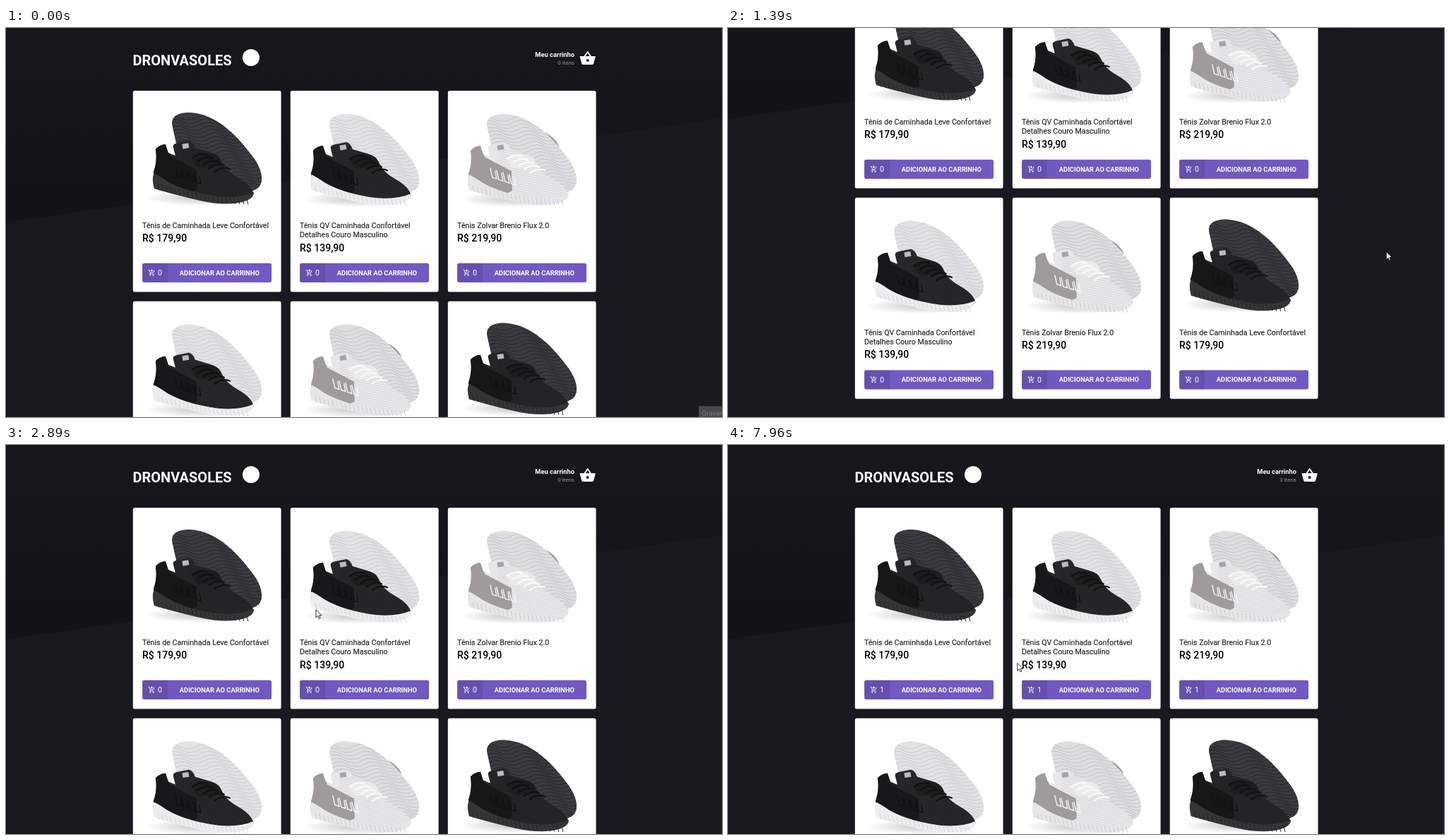
Animation, 1014 px wide and 552 px high, one loop 8000 ms. Source, as an HTML page:

```html
<!DOCTYPE html>
<html lang="pt-BR">
<head>
<meta charset="utf-8">
<style>
  html, body { margin: 0; width: 100%; height: 100%; overflow: hidden; background: #191920; }
  svg { display: block; font-family: Roboto, sans-serif; }
  .title { font-size: 10.67px; fill: #222; stroke: #222; stroke-width: .15; }
  .price { font-size: 14px; font-weight: 500; fill: #000; }
  .label { font-size: 9.33px; font-weight: 700; fill: #fff; }
  .count { font-size: 10.67px; fill: #fff; }
</style>
</head>
<body>
<svg id="stage" width="1014" height="552" viewBox="0 0 1014 552">
  <defs>
    <linearGradient id="top" x2="0" y2="1">
      <stop stop-color="#17171c"/><stop offset="1" stop-color="#131317"/>
    </linearGradient>
    <radialGradient id="shadow">
      <stop stop-color="#000" stop-opacity=".22"/><stop offset="1" stop-color="#000" stop-opacity="0"/>
    </radialGradient>
    <path id="outsole" d="M56 51C52 36 65 30 82 31C119 33 149 66 167 90C185 112 185 130 178 137Q172 143 158 144L100 118L62 78Z"/>
    <clipPath id="outsoleClip"><use href="#outsole"/></clipPath>
    <path id="upper" d="M32 83Q37 77 46 76L50 88L60 92L57 80Q56 75 64 74L79 71Q85 72 88 81L108 87Q121 90 125 99Q130 113 148 123Q168 134 171 147L164 153L130 154L80 146L32 126L29 116Q35 99 32 83Z"/>
    <clipPath id="upperClip"><use href="#upper"/></clipPath>
    <path id="cart" d="M11 9h2V6h3V4h-3V1h-2v3H8v2h3v3zm-4 9c-1.1 0-1.99.9-1.99 2S5.9 22 7 22s2-.9 2-2-.9-2-2-2zm10 0c-1.1 0-1.99.9-1.99 2s.89 2 1.99 2 2-.9 2-2-.9-2-2-2zm-9.83-3.25l.03-.12.9-1.63h7.45c.75 0 1.41-.41 1.75-1.03l3.86-7.01L19.42 4h-.01l-1.1 2-2.76 5H8.53L6.16 6l-.95-2-.94-2H1v2h2l3.6 7.59-1.35 2.45c-.16.28-.25.61-.25.96 0 1.1.9 2 2 2h12v-2H7.42c-.13 0-.25-.11-.25-.25z"/>
  </defs>
  <rect width="1014" height="552" fill="#191920"/>
  <g id="page">
    <path d="M0 0H1014V128L0 276Z" fill="url(#top)"/>
    <text x="179.5" y="53" font-size="20" font-weight="700" fill="#fff">DRONVASOLES</text>
    <circle cx="347" cy="42" r="12" fill="#fff"/>
    <text class="label" x="805" y="41" text-anchor="end">Meu carrinho</text>
    <text id="total" x="805" y="52" text-anchor="end" font-size="8" fill="#999"></text>
    <path transform="translate(811.7 31)" fill="#fff" d="M17.21 9l-4.38-6.56c-.19-.28-.51-.42-.83-.42-.32 0-.64.14-.83.43L6.79 9H2c-.55 0-1 .45-1 1 0 .09.01.18.04.27l2.54 9.27c.23.84 1 1.46 1.92 1.46h13c.92 0 1.69-.62 1.93-1.46l2.54-9.27L23 10c0-.55-.45-1-1-1h-4.79zM9 9l3-4.4L15 9H9zm3 8c-1.1 0-2-.9-2-2s.9-2 2-2 2 .9 2 2-.9 2-2 2z"/>
    <g id="cards"></g>
  </g>
  <g id="record">
    <rect x="981" y="536.5" width="34" height="16" fill="#49494c"/>
    <text x="985" y="550" font-size="9.5" style="font-family: 'Open Sans', sans-serif" fill="#858588">Gravar</text>
  </g>
  <g id="cursor" fill="#fff" stroke="#000" stroke-width=".8">
    <path id="arrow" d="M.3 .4V11.6L2.9 9.2L4.6 13L6.4 12.2L4.8 8.5H8.3Z"/>
    <path id="hand" d="M-1.3 1Q0 -.8 1.3 1V5.2L6 6.4Q7.4 6.9 7.2 9L6 13V15.8H-.8V14L-4.6 9.2Q-5 7.2 -3.2 7.8L-1.3 9.6Z"/>
  </g>
</svg>
<script>
const $ = id => document.getElementById(id);
const LOOP = 8000;

const looks = {
  black: { out: '#3b3b3f', groove: '#2a2a2d', upper: '#252527', heel: '#171718', sole: '#353538', tread: '#252528', lace: '#111112', dy: 0 },
  mixed: { out: '#e2e2e4', groove: '#d0d0d3', upper: '#272729', heel: '#18181a', sole: '#ededef', tread: '#d5d5d8', lace: '#101011', dy: 2 },
  white: { out: '#dedee0', groove: '#c9c9cc', upper: '#e7e7e9', heel: '#9f9a9b', sole: '#e6e6e8', tread: '#cdcdd0', lace: '#fafafa', dy: 2 },
};
const products = [
  { look: 'black', title: ['Tênis de Caminhada Leve Confortável'], price: '179,90' },
  { look: 'mixed', title: ['Tênis QV Caminhada Confortável', 'Detalhes Couro Masculino'], price: '139,90' },
  { look: 'white', title: ['Tênis Zolvar Brenio Flux 2.0'], price: '219,90' },
];

const repeat = (n, make) => Array.from({ length: n }, (_, i) => make(i)).join('');

function shoe(name) {
  const c = looks[name];
  const grooves = repeat(22, i => `M${40 + i * 3} ${40 + i * 5}q12 -9 25 -2t25 0t25 2t25 0t25 2`);
  const mesh = repeat(24, i => `M70 ${80 + i * 3.4}l110 22`);
  const laces = repeat(5, i => `M${84 + i * 8} ${95 + i * 5}q11 -8 21 -4`);
  const loops = repeat(4, i => `M${60 + i * 9} ${108 + i * 3}l3 13l6 2l-2 -11`);
  const treads = repeat(22, i => `M${35 + i * 6} ${133 + 20 * Math.sin(i / 14)}l2 8`);
  const stripe = name === 'white'
    ? `<path d="M136 57Q150 62 158 77L150 72Z" fill="${c.heel}"/>` : '';
  return `<g transform="translate(0 ${c.dy})" fill="none" stroke-linecap="round">
    <ellipse cx="95" cy="152" rx="78" ry="11" fill="url(#shadow)"/>
    ${stripe}<use href="#outsole" fill="${c.out}"/>
    <path d="${grooves}" stroke="${c.groove}" stroke-width="1.2" clip-path="url(#outsoleClip)"/>
    <use href="#upper" fill="${c.upper}"/>
    <g clip-path="url(#upperClip)">
      <path d="${mesh}" stroke="${c.heel}" stroke-width=".7" opacity=".3"/>
      <path d="M28 72L47 74L52 92L90 112L91 140L72 150L25 130Z" fill="${c.heel}"/>
      <path d="M82 94Q98 84 121 91L125 105Q108 110 91 108Z" fill="${c.lace}" opacity=".35"/>
    </g>
    <path d="${loops}" stroke="${c.lace}" stroke-width="1.3"/>
    <path d="${laces}" stroke="${c.lace}" stroke-width="2.3"/>
    <rect x="70" y="75" width="9" height="7" transform="rotate(-10 74 78)" fill="${name === 'white' ? '#a5a5a7' : '#bbb'}"/>
    <path d="M30 117Q26 124 30 139Q60 148 95 156Q130 164 155 158Q172 153 171 144Q150 153 120 150Q75 144 48 128Q38 121 30 117Z" fill="${c.sole}"/>
    <path d="${treads}" stroke="${c.tread}" stroke-width="1"/>
  </g>`;
}

function card({ look, title, price }, i) {
  const x = 179.8 + (i % 3) * 223, y = 89 + Math.floor(i / 3) * 298.7;
  const lines = title.map((line, n) => `<text class="title" x="13.3" y="${195 + n * 13.4}">${line}</text>`).join('');
  return `<g transform="translate(${x} ${y})">
    <rect width="209.8" height="285.6" rx="2.7" fill="#fff"/>
    ${shoe(look)}${lines}
    <text class="price" x="13.3" y="${200.8 + title.length * 13.4}">R$ ${price}</text>
    <rect class="button" x="13.3" y="244.7" width="183" height="27.3" rx="2.7" fill="#7159c1"/>
    <path d="M49.3 244.7H16a2.7 2.7 0 0 0 -2.7 2.7V269.3a2.7 2.7 0 0 0 2.7 2.7H49.3Z" fill="#000" opacity=".1"/>
    <use href="#cart" transform="translate(21.3 253) scale(.445)" fill="#fff"/>
    <text class="count" x="35.3" y="262.3">0</text>
    <text class="label" x="122.6" y="261.7" text-anchor="middle">ADICIONAR AO CARRINHO</text>
  </g>`;
}

$('cards').innerHTML = [0, 1, 2, 1, 2, 0].map((p, i) => card(products[p], i)).join('');
const buttons = document.querySelectorAll('.button');
const counts = document.querySelectorAll('.count');

// [time, scroll offset], each held until the next
const scrollSteps = [
  [0, 0], [1040, 14], [1110, 44], [1180, 76], [1250, 108], [1320, 133], [1390, 147],
  [1920, 140], [1990, 114], [2060, 81], [2130, 48], [2200, 24], [2280, 8], [2350, 0],
];
// [time, x, y] of the pointer tip
const pointerPath = [
  [70, 1001, 538], [280, 962, 420], [510, 932, 317], [2560, 932, 317], [2720, 740, 270], [2890, 440, 233],
  [3030, 262, 268], [3130, 204, 312], [3240, 240, 342], [3350, 300, 347], [3490, 336, 341], [3800, 336, 341],
  [3910, 340, 338], [4640, 340, 338], [4850, 392, 346], [5160, 475, 345], [5430, 477, 346], [5980, 477, 346],
  [6150, 555, 362], [6300, 612, 360], [6630, 699, 344], [6860, 699, 344], [7030, 702, 342],
  [7510, 702, 342], [7740, 580, 340], [7960, 409.5, 309],
];
const hovers = [[3330, 4720], [4930, 6100], [6390, 7620]];
const added = [4290, 5500, 7560];

const held = (steps, t) => steps.filter(s => s[0] <= t).pop()[1];

function along(path, t) {
  const n = path.findIndex(p => p[0] > t);
  if (n < 0) return path[path.length - 1].slice(1);
  if (!n) return path[0].slice(1);
  const a = path[n - 1], b = path[n], k = (t - a[0]) / (b[0] - a[0]);
  return [1, 2].map(j => a[j] + (b[j] - a[j]) * k);
}

const clamp = v => Math.min(1, Math.max(0, v));
const mix = (a, b, k) => `rgb(${a.map((v, i) => Math.round(v + (b[i] - v) * k))})`;

function draw(t) {
  $('page').setAttribute('transform', `translate(0 ${-held(scrollSteps, t)})`);
  $('record').style.opacity = clamp(1 - (t - 70) / 140);

  const total = added.filter(at => t >= at).length;
  $('total').textContent = `${total} ${total === 1 ? 'item' : 'itens'}`;
  added.forEach((at, i) => {
    const [start, end] = hovers[i];
    const fade = clamp((t - start) / 180) - clamp((t - end) / 180);
    counts[i].textContent = t >= at ? 1 : 0;
    buttons[i].setAttribute('fill', mix([113, 89, 193], [94, 67, 181], fade));
  });

  const pointing = hovers.some(([start, end]) => t >= start && t < end);
  $('cursor').setAttribute('transform', `translate(${along(pointerPath, t)})`);
  $('cursor').style.display = t < 70 ? 'none' : '';
  $('arrow').style.display = pointing ? 'none' : '';
  $('hand').style.display = pointing ? '' : 'none';
}

const began = performance.now();
function tick() {
  draw((performance.now() - began) % LOOP);
  requestAnimationFrame(tick);
}
tick();
</script>
</body>
</html>
```
